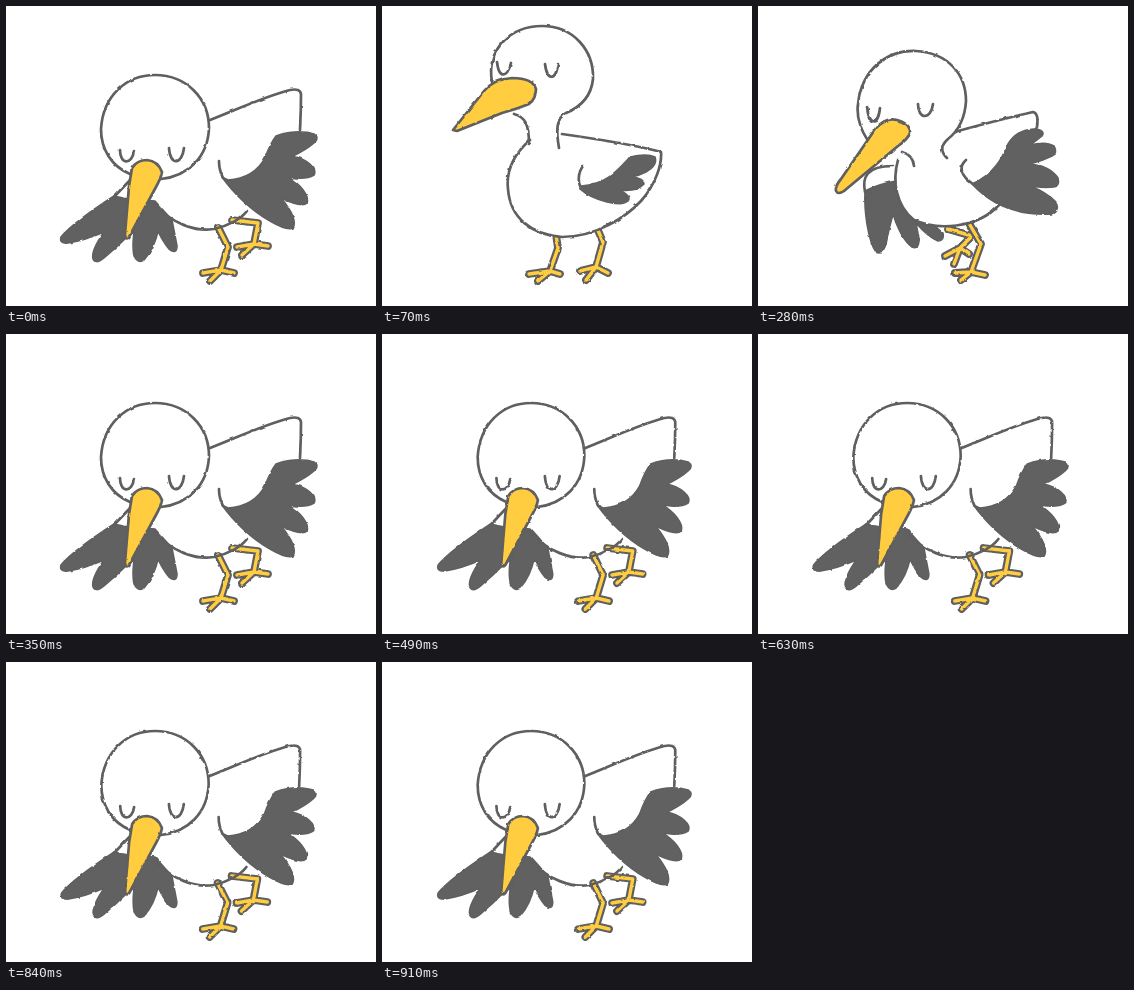
An HTML page that plays this animation: 370x300 px, repeating every 0.98 s.

```html
<!DOCTYPE html>
<html lang="en">
<head>
<meta charset="utf-8">
<title>Bowing stork</title>
<style>
  html, body { margin: 0; width: 100%; height: 100%; overflow: hidden; background: #fff; }
  svg { display: block; }
  path { stroke: #5f5f5f; stroke-width: 2.7; stroke-linecap: round; stroke-linejoin: round; fill: none; }
  .white { fill: #fff; }
  .dark { fill: #616161; stroke-width: 1.6; }
  .beak { fill: #ffcd3f; }
  .rim { stroke-width: 7.8; }
  .leg { stroke: #ffcd3f; stroke-width: 3.4; }
</style>
</head>
<body>
<svg width="370" height="300" viewBox="0 0 370 300">
  <filter id="crayon" filterUnits="userSpaceOnUse" x="0" y="0" width="370" height="300" color-interpolation-filters="sRGB">
    <feTurbulence id="noise" type="fractalNoise" baseFrequency=".14" numOctaves="2" seed="1"/>
    <feDisplacementMap in="SourceGraphic" scale="2.4" xChannelSelector="R" yChannelSelector="G"/>
  </filter>
  <g filter="url(#crayon)"><g id="bird"></g></g>
</svg>
<script>
const STEP = 70, STEPS = 14;
const bird = document.getElementById('bird');
const noise = document.getElementById('noise');

const shape = (kind, d) => `<path class="${kind}" d="${d}"/>`;
const line = d => shape('line', d);
const white = d => shape('white', d);
const dark = d => shape('dark', d + 'Z');
const beak = d => shape('beak', d + 'Z');

// A bent leg ending at x,y with three toes
function leg(d, x, y, toes) {
  const path = `M${d}L${x} ${y}` + toes.map(t => `M${x} ${y}L${t}`).join('');
  return shape('rim', path) + shape('leg', path);
}

const stand =
  leg('174 229L176 242', 168, 265, ['147 268', '156 275', '178 268']) +
  leg('215 222L221 236', 214, 261, ['198 265', '204 274', '226 267']) +
  white('M148 134C132 148 124 165 126 183C128 212 150 229 180 231C215 231 245 210 259 195C274 178 280 158 279 146C250 138 215 133 180 128') +
  line('M201 160C195 168 196 178 200 183') +
  dark('M199 180C225 178 235 165 248 151Q265 147 273 151Q276 159 264 166Q258 169 250 171Q262 172 262 178Q255 186 237 184Q250 190 246 195Q240 200 225 196Q208 192 198 183') +
  white('M110 76C104 42 130 20 160 20C192 20 212 45 211 73C209 93 196 102 184 107C174 112 174 125 177 142') +
  line('M132 108C143 111 147 118 147 138') +
  line('M115 56C117 73 125 72 129 57M163 58C165 75 174 75 176 58') +
  beak('M71 124L102 85Q112 73 130 72Q151 72 154 83Q154 93 147 98Q135 103 120 107L75 125');

const dip =
  leg('190 223L214 230', 202, 242, ['187 250', '196 258', '211 248']) +
  leg('212 219L223 238', 213, 266, ['197 267', '203 274', '227 269']) +
  dark('M107 185C106 205 110 235 118 246Q124 250 128 238Q131 222 135 208Q143 233 154 241Q161 244 161 233L158 217Q170 231 180 235Q187 234 185 227L178 221L156 214Q136 200 138 175Q120 178 107 185') +
  line('M107 186C104 172 108 160 135 160') +
  white('M185 139Q190 128 200 125Q240 114 275 106Q281 107 279 121L241 199C220 222 180 225 156 214C138 200 134 175 140 154') +
  dark('M214 178C237 168 245 150 250 138Q258 124 276 123Q288 124 284 130Q278 135 272 139Q288 135 296 140Q300 147 294 150Q284 155 272 158Q292 160 300 172Q302 180 296 181Q284 182 272 180Q288 186 298 196Q302 206 294 208Q265 210 240 198Q225 190 214 178') +
  line('M208 154C200 161 203 170 215 178') +
  white('M116 141C104 130 98 112 100 98C104 62 130 44 158 45C190 47 208 68 208 95C207 112 200 125 190 133C182 140 183 146 189 152') +
  line('M144 146Q155 149 156 160') +
  line('M109 101C111 120 120 120 122 102M160 98C160 114 173 114 175 98') +
  beak('M78 185Q77 180 83 173L118 122Q128 111 139 114Q153 118 152 127Q150 133 140 140L86 185Q80 189 78 185');

const bow =
  leg('226 214L252 217', 248, 238, ['231 241', '236 249', '262 240']) +
  leg('212 221L222 241', 215, 264, ['197 267', '204 275', '228 267']) +
  dark('M108 190C88 203 65 219 55 231Q53 238 62 237Q80 234 98 226C91 236 85 246 87 253Q90 259 98 252Q110 242 121 231L128 226Q126 240 128 250Q132 258 138 254C145 246 150 235 152 225Q157 236 163 243Q171 249 171 240L166 214L149 195L122 193') +
  line('M107 192L126 172') +
  line('M147 196C165 218 190 226 208 223C222 220 235 213 241 205') +
  line('M204 114C232 103 260 90 284 84Q294 82 295 88Q295 105 294 124') +
  dark('M222 174C240 173 252 165 259 152Q264 138 270 130Q290 123 308 128Q314 132 308 137Q300 144 287 150C300 153 312 162 308 169Q300 174 282 171C294 178 304 190 301 197Q296 202 275 192C286 205 291 215 287 222Q281 225 264 215C246 205 228 188 216 171') +
  line('M213 155Q213 164 217 172') +
  white('M124 168C105 160 95 143 95 123C97 90 120 69 149 69C180 69 203 92 203 122C202 151 182 170 155 173') +
  line('M114 144C114 159 126 159 128 145M163 142C164 160 176 159 178 142') +
  beak('M126 162Q131 154 141 154Q152 155 156 166Q155 172 150 181L123 231Q119 235 119 228L123 180');

const poseAt = step => step === 0 || step > 4 ? bow : step < 3 ? stand : dip;

let shownPose, shownStep = -1;
function draw() {
  const step = Math.floor(performance.now() / STEP) % STEPS;
  if (step !== shownStep) {
    const pose = poseAt(step);
    const wobble = ((step || STEPS) + 1) % 3;
    if (pose !== shownPose) bird.innerHTML = pose;
    const squeeze = pose === bow ? 1 - wobble * .006 : 1;
    bird.setAttribute('transform', `translate(150 0) scale(${squeeze} 1) translate(-150 0)`);
    noise.setAttribute('seed', wobble + 1);
    shownPose = pose;
    shownStep = step;
  }
  requestAnimationFrame(draw);
}
draw();
</script>
</body>
</html>
```
